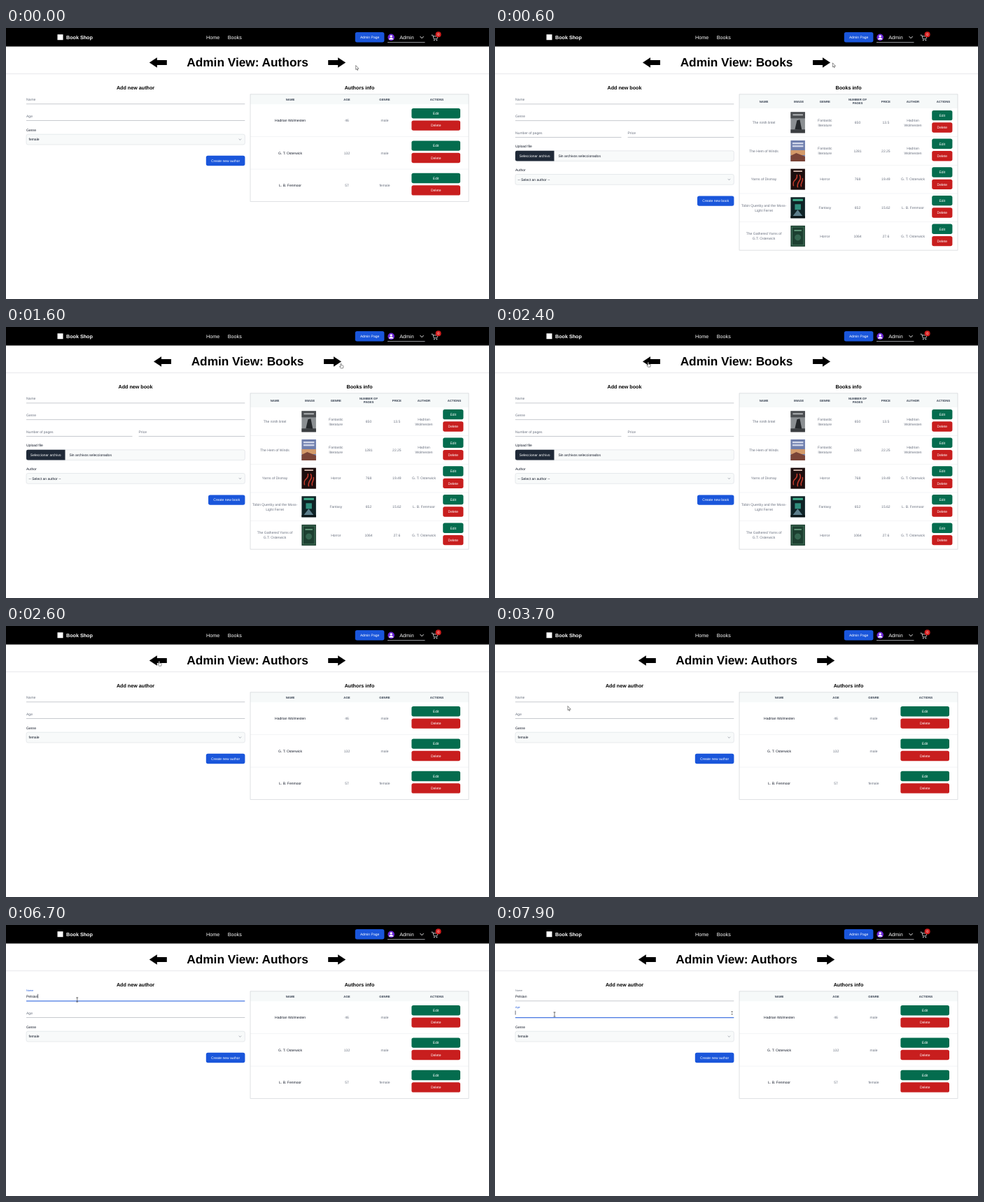
These frames come from a looping animation (690x388 px, 8 s). An HTML page:

```html
<!DOCTYPE html>
<html lang="en">
<head>
<meta charset="utf-8">
<title>Book Shop admin</title>
<style>
  html, body { margin: 0; width: 100%; height: 100%; overflow: hidden; background: #fff; }
  svg { display: block; width: 100vw; height: 100vh; }
  text { font-family: "Liberation Sans", Arial, sans-serif; text-rendering: geometricPrecision; white-space: pre; }
</style>
</head>
<body>
<svg id="stage" viewBox="0 0 690 388"></svg>
<script>
const LOOP = 8000;
const SMALL = 5.03, MEDIUM = 7.18, TINY = 4.31, HUGE = 17.25;
const BLUE = '#1a56db', GREEN = '#046c4e', RED = '#c81e1e';
const INK = '#111827', GRAY = '#6b7280', LINE = '#b9bdc3', PALE = '#f8fafa';

// ---- markup helpers; text is placed by its vertical centre ----
const text = (str, x, cy, { size = SMALL, fill = INK, anchor = 'start', bold = false, id = '' } = {}) =>
  `<text ${id && `id="${id}"`} x="${x}" y="${(cy + size * 0.36).toFixed(2)}" font-size="${size}" fill="${fill}"` +
  ` text-anchor="${anchor}" font-weight="${bold ? 700 : 400}">${str}</text>`;
const mid = (str, x, cy, opts = {}) => text(str, x, cy, { anchor: 'middle', ...opts });
const rect = (x, y, w, h, fill, rx = 0, extra = '') =>
  `<rect x="${x}" y="${y}" width="${w}" height="${h}" fill="${fill}" rx="${rx}" ${extra}/>`;
const path = (d, stroke, width, fill = 'none') =>
  `<path d="${d}" fill="${fill}" stroke="${stroke}" stroke-width="${width}" stroke-linecap="round" stroke-linejoin="round"/>`;
const rule = (x, y, w, fill = LINE) => rect(x, y - 0.4, w, 0.8, fill);
const button = (label, x, y, w, fill, h = 14.4) =>
  rect(x, y, w, h, fill, 2.7) + mid(label, x + w / 2, y + h / 2, { fill: '#fff' });
const lines = (str, x, cy, gap, opts) => {
  const parts = str.split('|');
  return parts.map((p, i) => mid(p, x, cy + (i - (parts.length - 1) / 2) * gap, opts)).join('');
};
const field = (label, x, cy, w) => text(label, x, cy, { fill: GRAY }) + rule(x, cy + 6.6, w);
const box = (y, fill = PALE) => rect(29, y, 312.3, 14.8, fill, 2.4, 'stroke="#d1d5db" stroke-width=".5"');
const select = (label, y) => box(y) + text(label, 32.5, y + 7.3) +
  path(`M333 ${y + 6.7}l1.4 1.5l1.4-1.5`, GRAY, 0.55);

const ARROW = 'M0 7.3L11 0V3.7H25V10.9H11V14.6Z';
function heading(title, left) {
  return `<path d="${ARROW}" transform="translate(${left} 42.2)"/>` +
    `<path d="${ARROW}" transform="translate(${690 - left} 42.2) scale(-1 1)"/>` +
    mid(title, 345, 49.2, { size: HUGE, bold: true, fill: '#000' });
}
const subheads = (a, b) => [[a, 185], [b, 505]]
  .map(([s, x]) => mid(s, x, 85.1, { size: MEDIUM, bold: true, fill: '#000' })).join('');

function table(columns, headHeight, rowHeight, count, drawRow) {
  const height = headHeight + rowHeight * count;
  let out = rect(349, 95, 312, headHeight, '#f6f9f9');
  for (const [name, x] of columns)
    out += lines(name, x, 95 + headHeight / 2, 5.74, { size: TINY, bold: true, fill: '#374151' });
  for (let i = 0; i < count; i++) {
    const top = 95 + headHeight + rowHeight * i;
    if (i) out += rect(349, top - 0.2, 312, 0.5, '#e8eaed');
    out += drawRow(i, top + rowHeight / 2);
  }
  return out + rect(349, 94.9, 312, height, 'none', 0, 'stroke="#d0d3d7" stroke-width=".7"');
}
const actions = (x, w, cy) => button('Edit', x, cy - 17.4, w, GREEN) + button('Delete', x, cy, w, RED);

// ---- invented data ----
const authors = [
  ['Hadrian Wolmesten', 46, 'male'],
  ['G. T. Osterwick', 132, 'male'],
  ['L. B. Fenmoor', 57, 'female'],
];
const books = [
  ['The ninth lintel', 'Fantastic|literature', 650, '13.5', 'Hadrian|Wolmesten'],
  ['The Hem of Winds', 'Fantastic|literature', 1281, '22.25', 'Hadrian|Wolmesten'],
  ['Yarns of Dismay', 'Horror', 768, '19.49', 'G. T. Osterwick'],
  ['Tobin Quenby and the Moss-|Light Ferret', 'Fantasy', 652, '15.62', 'L. B. Fenmoor'],
  ['The Gathered Yarns of|G.T. Osterwick', 'Horror', 1064, '27.6', 'G. T. Osterwick'],
];
const covers = [
  rect(0, 0, 20.5, 30, '#8b8f92') + rect(0, 0, 20.5, 9, '#4a4d50') + rect(3, 3, 14.5, 2, '#aeb1b3') +
    path('M6 25L9 12L13 11L16 26Z', 'none', 0, '#25282b') + rect(0, 25, 20.5, 5, '#3b3e41'),
  rect(0, 0, 20.5, 30, '#6f7fae') + rect(2.5, 3, 15.5, 2.4, '#cfd5e8') + rect(2.5, 7, 15.5, 2.4, '#cfd5e8') +
    rect(0, 14, 20.5, 7, '#d39a6a') + path('M0 22L8 18L20.5 23V30H0Z', 'none', 0, '#7a4437'),
  rect(0, 0, 20.5, 30, '#1c0d0d') + rect(4, 2.5, 12.5, 1.8, '#d8b8ae') +
    path('M4 24C2 14 10 18 9 9M10 26C8 18 17 17 13 9M15 25C13 21 18 19 17 14', '#c0392b', 1.6),
  rect(0, 0, 20.5, 30, '#0f2326') + rect(3, 2.5, 14.5, 3, '#3fae8b') + rect(6, 10, 8.5, 8, '#2f8f7d') +
    path('M3 27L10 18L17 27Z', 'none', 0, '#5d7f8c') + rect(0, 27, 20.5, 3, '#0a1416'),
  rect(0, 0, 20.5, 30, '#1c3f30') + rect(2, 2, 16.5, 26, 'none', 0, 'stroke="#4d8065" stroke-width=".8"') +
    rect(5, 6, 10.5, 2, '#5e9477') + '<circle cx="10.2" cy="17" r="4.5" fill="#356650"/>',
];

// ---- static pieces ----
const navbar = rect(0, 0, 690, 26.5, '#000') +
  rect(73.5, 9.2, 8, 8, '#fff') +
  text('Book Shop', 86, 13.2, { size: MEDIUM, bold: true, fill: '#fff' }) +
  text('Home', 286, 13.2, { size: MEDIUM, fill: '#fff' }) +
  text('Books', 316.8, 13.2, { size: MEDIUM, fill: '#fff' }) +
  button('Admin Page', 498.8, 6, 41.6, BLUE) +
  '<circle cx="550.2" cy="13.4" r="4.8" fill="#6d28d9"/><circle cx="550.2" cy="11.9" r="1.7" fill="#fff"/>' +
  '<path d="M547 16.6a3.2 2.7 0 0 1 6.4 0z" fill="#fff"/>' +
  text('Admin', 562.3, 13.2, { size: MEDIUM, fill: '#fff' }) +
  path('M591.8 12.2l2.3 2.5l2.3-2.5', '#fff', 0.9) +
  rect(545, 20.1, 53.5, 0.7, '#d1d5db') +
  path('M608 10.2h1.7l1.6 5.6h4.4l1.2-4h-6.6', '#e5e7eb', 0.8) +
  '<circle cx="611.8" cy="17.6" r=".8" fill="#e5e7eb"/><circle cx="615.4" cy="17.6" r=".8" fill="#e5e7eb"/>' +
  '<circle cx="617.6" cy="9.3" r="4" fill="#d61f1f"/>' + mid('0', 617.6, 9.3, { fill: '#fff' }) +
  rect(0, 65.4, 690, 0.7, '#dcdee1');

const authorsView = heading('Admin View: Authors', 204.8) + subheads('Add new author', 'Authors info') +
  text('Name', 29, 0, { id: 'nameLabel' }) + text('', 29, 101.7, { id: 'nameValue' }) +
  text('Age', 29, 0, { id: 'ageLabel' }) +
  '<rect id="nameLine" x="29" width="312.3"/><rect id="ageLine" x="29" width="312.3"/>' +
  '<path id="spinner" d="M337.2 124.9l1.4-1.7l1.4 1.7zM337.2 126.9l1.4 1.7l1.4-1.7z" fill="#555"/>' +
  `<rect id="caret" width=".6" height="6" fill="${INK}"/>` +
  text('Genre', 29, 145.9) + select('female', 152.2) +
  button('Create new author', 285.8, 182.8, 55.6, BLUE) +
  table([['NAME', 406], ['AGE', 487], ['GENRE', 541], ['ACTIONS', 615.5]], 14.2, 46.4, 3, (i, cy) => {
    const [name, age, genre] = authors[i];
    return mid(name, 406, cy) + mid(age, 487, cy, { fill: GRAY }) +
      mid(genre, 541, cy, { fill: GRAY }) + actions(579.4, 69.6, cy);
  });

const bookColumns = [['NAME', 384], ['IMAGE', 434], ['GENRE', 471.3], ['NUMBER OF|PAGES', 518],
  ['PRICE', 558.4], ['AUTHOR', 597], ['ACTIONS', 640.5]];
const booksView = heading('Admin View: Books', 211) + subheads('Add new book', 'Books info') +
  field('Name', 29, 102.3, 312.3) + field('Genre', 29, 126.1, 312.3) +
  field('Number of pages', 29, 149.9, 151.5) + field('Price', 189.6, 149.9, 151.7) +
  text('Upload file', 29, 169.2) + box(175.8) +
  '<path d="M84.5 175.8V190.6H31.4a2.4 2.4 0 0 1-2.4-2.4V178.2a2.4 2.4 0 0 1 2.4-2.4z" fill="#1f2937"/>' +
  text('Seleccionar archivo', 34.8, 183.3, { fill: '#fff' }) + text('Sin archivos seleccionados', 90.4, 183.3) +
  text('Author', 29, 202.8) + select('-- Select an author --', 209.5) +
  button('Create new book', 289, 240.4, 52.4, BLUE) +
  table(bookColumns, 20, 40.65, 5, (i, cy) => {
    const [name, genre, pages, price, author] = books[i];
    const cells = [[name, 384], [genre, 471.3], [pages, 518], [price, 558.4], [author, 597]];
    return cells.map(([s, x]) => lines(String(s), x, cy, MEDIUM, { fill: GRAY })).join('') +
      `<g transform="translate(422.4 ${cy - 15})">${covers[i]}</g>` + actions(624.2, 29.2, cy);
  });

// pointer shapes, hot spot at 0,0
const pointers = {
  arrow: path('M0 0V5.6L1.3 4.5L2.2 6.6L3.1 6.2L2.2 4.2H3.9Z', '#333', 0.55, '#fff'),
  hand: path('M-.6 .6Q0-.4 .7 .6V2.7L3 3.3Q3.7 3.6 3.5 4.6L2.9 7H-.4L-2 4.5Q-1.9 3.6-.6 4.4Z', '#333', 0.55, '#fff'),
  beam: path('M-1.1-3H1.1M0-3V3M-1.1 3H1.1', '#333', 0.65),
};

const stage = document.getElementById('stage');
stage.innerHTML = navbar + `<g id="authors">${authorsView}</g><g id="books">${booksView}</g><g id="pointer">` +
  Object.entries(pointers).map(([k, v]) => `<g id="${k}">${v}</g>`).join('') + '</g>';
const ui = {};
stage.querySelectorAll('[id]').forEach(n => { ui[n.id] = n; });

// ---- motion ----
const TO_BOOKS = 400, TO_AUTHORS = 2600, NAME_FOCUS = 4055, AGE_FOCUS = 7450;
const TYPED = 'Pelsian';
const keyTimes = [5360, 5860, 6260, 6290, 6460, 6640, 6680];
const track = [
  [0, 499.7, 54], [350, 482.3, 50.3], [1300, 482.3, 50.3], [1600, 478.5, 52], [1950, 478.5, 52],
  [2400, 218.8, 50.2], [2800, 218.8, 50.2], [3450, 109, 111], [3700, 104, 115],
  [4000, 101.7, 107], [7150, 101.7, 107], [7450, 85, 128], [LOOP, 85, 128],
];
const ease = p => { p = Math.min(1, Math.max(0, p)); return p * p * (3 - 2 * p); };
const show = (node, on) => node.setAttribute('visibility', on ? 'inherit' : 'hidden');
const set = (node, attrs) => { for (const k in attrs) node.setAttribute(k, attrs[k]); };

function pointerAt(t) {
  const i = track.findIndex(k => k[0] > t);
  const [t0, x0, y0] = track[i - 1], [t1, x1, y1] = track[i];
  const p = ease((t - t0) / (t1 - t0));
  return [x0 + (x1 - x0) * p, y0 + (y1 - y0) * p];
}

function pointerKind(x, y, onBooks) {
  const left = onBooks ? 211 : 204.8, dx = Math.abs(x - 345);
  if (y > 42 && y < 57 && dx > 320 - left && dx < 345 - left) return 'hand';
  const overField = (y > 96 && y < 109) || (y > 119.5 && y < 133);
  return overField && x > 29 && x < 341 ? 'beam' : 'arrow';
}

function drawField(label, line, cy, raised, focused) {
  const size = SMALL * (1 - 0.25 * raised);
  set(label, { y: cy - 8.5 * raised + size * 0.36, 'font-size': size, fill: focused ? BLUE : GRAY });
  set(line, { y: cy + 6.1, height: focused ? 1 : 0.8, fill: focused ? BLUE : LINE });
}

function render(t) {
  const onBooks = t >= TO_BOOKS && t < TO_AUTHORS;
  show(ui.books, onBooks);
  show(ui.authors, !onBooks);

  const onAge = t >= AGE_FOCUS, onName = t >= NAME_FOCUS && !onAge;
  drawField(ui.nameLabel, ui.nameLine, 102.3, ease((t - NAME_FOCUS) / 300), onName);
  drawField(ui.ageLabel, ui.ageLine, 126.1, ease((t - AGE_FOCUS) / 300), onAge);
  show(ui.spinner, onAge && !onBooks);

  const keys = keyTimes.filter(k => k <= t);
  ui.nameValue.textContent = TYPED.slice(0, keys.length);
  const since = onAge ? AGE_FOCUS : Math.max(NAME_FOCUS, ...keys);
  show(ui.caret, (onName || onAge) && (t - since) % 1060 < 530);
  const advance = onName && keys.length ? ui.nameValue.getComputedTextLength() : 0;
  set(ui.caret, { x: 28.8 + advance, y: onAge ? 122.6 : 98.8 });

  const [x, y] = pointerAt(t), kind = pointerKind(x, y, onBooks);
  set(ui.pointer, { transform: `translate(${x} ${y})` });
  for (const k in pointers) show(ui[k], k === kind);
}

const start = performance.now();
function tick() {
  render((performance.now() - start) % LOOP);
  requestAnimationFrame(tick);
}
tick();
</script>
</body>
</html>
```
